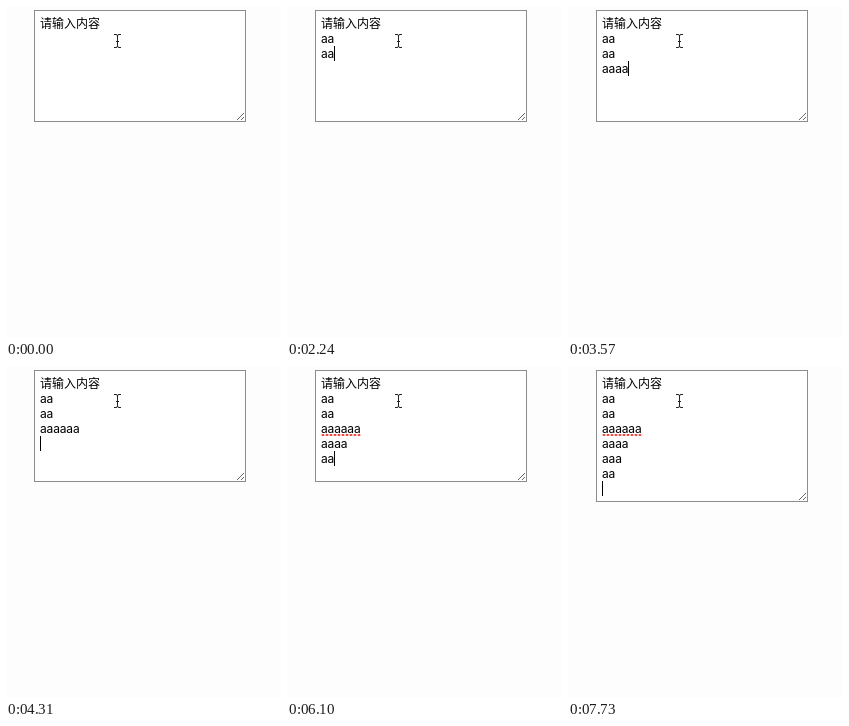
Recreate the animation shown at these times as an HTML page. Size 275 px wide and 332 px high, loop 8 s.

```html
<!DOCTYPE html>
<html lang="zh">
<head>
<meta charset="utf-8">
<title>Growing text box</title>
<style>
html, body { margin: 0; width: 100%; height: 100%; overflow: hidden; background: #fdfdfd; }
#box {
  position: absolute; left: 28px; top: 4px; width: 212px; height: 112px;
  box-sizing: border-box; border: 1px solid #8c8c8c; background: #fff;
}
#text {
  position: absolute; left: 5px; top: 5px; white-space: pre; color: #000;
  font: 12px/15px Inter, "Noto Sans CJK SC", "Noto Sans CJK", sans-serif;
  letter-spacing: -.15px;
}
#text::first-line { letter-spacing: 0; }
#caret { position: absolute; width: 1px; height: 15px; background: #000; }
svg { position: absolute; fill: none; }
#grip { right: 0; bottom: 0; }
#spell { left: 34px; top: 67px; }
#pointer { left: 107px; top: 27px; }
</style>
</head>
<body>
<div id="box">
  <div id="text"></div>
  <svg id="grip" width="9" height="9" stroke="#6a6a6a"><path d="M1 8 8 1M5 8 8 5"/></svg>
</div>
<svg id="spell" width="40" height="4"><path d="M1.5 2H39" stroke="#f0463c" stroke-width="2" stroke-linecap="round" stroke-dasharray="1 3"/></svg>
<div id="caret"></div>
<svg id="pointer" width="9" height="16" stroke="#222">
  <path d="M1 1.5H3Q4.5 1.5 4.5 3V13Q4.5 14.5 3 14.5H1M8 1.5H6Q4.5 1.5 4.5 3M4.5 13Q4.5 14.5 6 14.5H8M3 8.5H6"/>
</svg>
<script>
const LOOP = 8000, LINE = 15, ADVANCE = 6.6, PROMPT = '请输入内容';

// "|" shows the caret, "-" hides it, "~" marks the misspelling; the rest is typed
const keys = [
  [290, '|'], [590, '\n'], [1040, '-'], [1190, 'a'], [1490, 'a'],
  [1640, '\n'], [1940, 'a'], [2240, 'a'],
  [2530, '\n'], [2830, 'a'], [3120, 'a'], [3420, 'a'], [3570, 'a'], [3870, 'a'], [4160, 'a'],
  [4310, '\n'], [4460, '~'], [4610, 'a'], [4910, 'a'], [5060, 'a'], [5510, 'a'],
  [5660, '\n'], [5950, 'a'], [6100, 'a'], [6550, '-'], [6690, 'a'],
  [6990, '\n'], [7290, 'a'], [7440, 'a'], [7730, '\n']
];

const el = id => document.getElementById(id);
const box = el('box'), text = el('text'), caret = el('caret'), spell = el('spell');
let shown = -1;

function draw(count) {
  let value = PROMPT, caretOn = false, marked = false;
  for (const [, key] of keys.slice(0, count)) {
    if (key === '~') { marked = true; continue; }
    caretOn = key !== '-';
    if (key === 'a' || key === '\n') value += key;
  }
  const lines = value.split('\n'), row = lines.length - 1;
  const width = row ? Math.round(lines[row].length * ADVANCE) : 60;
  text.textContent = value;
  box.style.height = Math.max(112, 12 + LINE * lines.length) + 'px';
  caret.style.left = 34 + width + 'px';
  caret.style.top = 10 + LINE * row + 'px';
  caret.style.visibility = caretOn ? 'visible' : 'hidden';
  spell.style.visibility = marked ? 'visible' : 'hidden';
}

function tick() {
  const t = performance.now() % LOOP;
  const count = keys.filter(([at]) => at <= t).length;
  if (count !== shown) draw(shown = count);
  requestAnimationFrame(tick);
}
tick();
</script>
</body>
</html>
```
